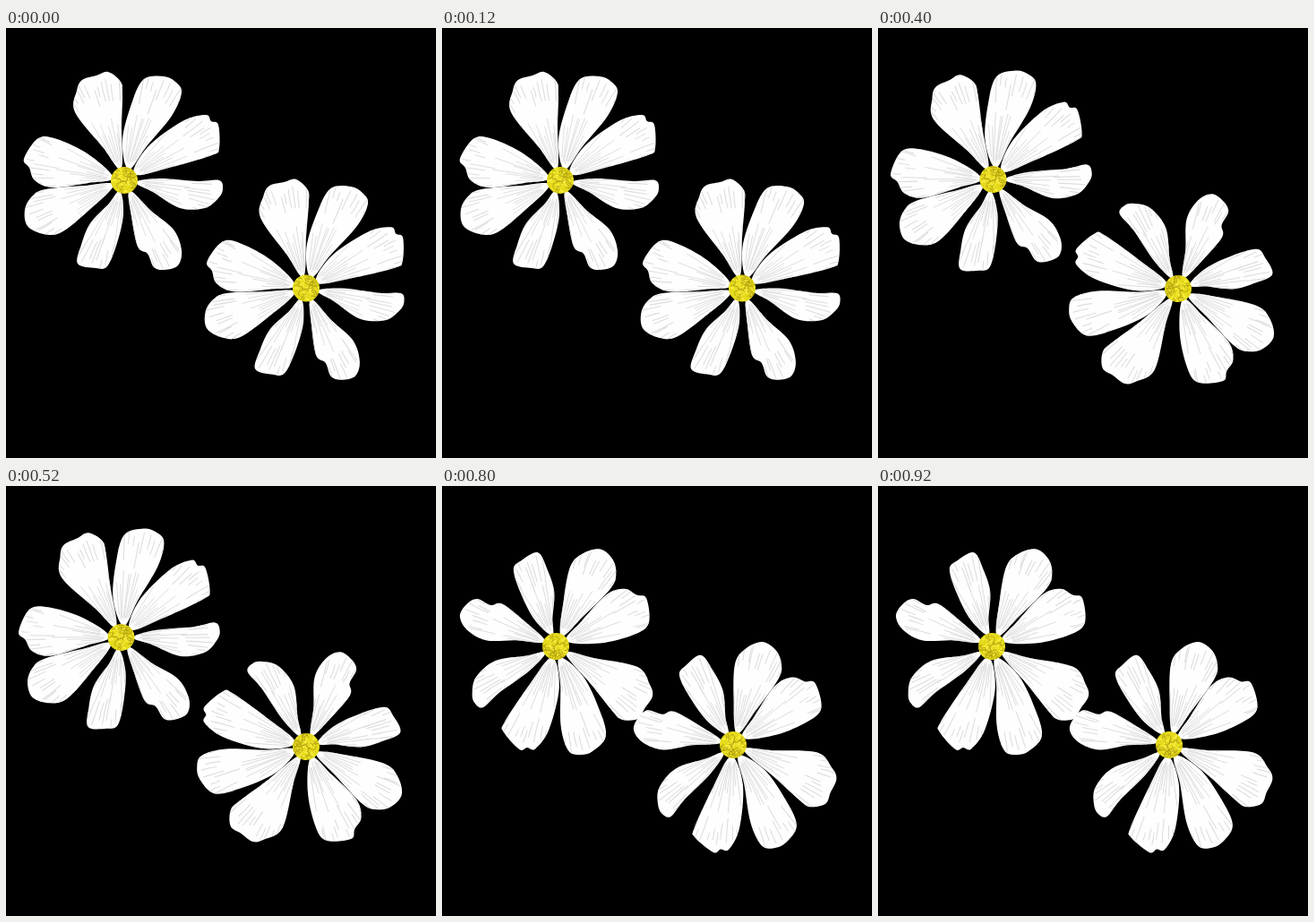
An HTML page with a canvas for the animation above (1 s loop, 480 by 480 pixels).

```html
<!DOCTYPE html>
<html lang="en">
<head>
<meta charset="utf-8">
<title>Daisies</title>
<style>
  html, body { margin: 0; width: 100%; height: 100%; overflow: hidden; background: #000; }
  canvas { display: block; width: 100vw; height: 100vh; }
</style>
</head>
<body>
<canvas id="stage" width="480" height="480"></canvas>
<script>
const ctx = document.getElementById('stage').getContext('2d');
const STEP = 200;

// Petal outlines, clockwise, relative to the flower centre.
const outlines = [
  [-24,-37, -55,-76, -53,-100, -47,-112, -31,-117, -18,-121, -4,-110, -2,-95, -3,-58],
  [-2,-45, 9,-88, 22,-113, 44,-116, 57,-110, 64,-98, 53,-72, 25,-38],
  [26,-37, 65,-66, 91,-73, 97,-66, 105,-62, 106,-36, 98,-28, 50,-14],
  [40,-2, 82,1, 106,0, 110,10, 105,20, 90,31, 62,31, 32,13],
  [8,40, 15,74, 26,82, 33,97, 45,100, 60,95, 64,78, 55,55, 30,34],
  [-1,38, -8,70, -19,96, -32,98, -52,93, -48,72, -38,48, -18,27],
  [-45,6, -88,10, -103,18, -111,33, -108,51, -90,60, -70,58, -40,34],
  [-40,3, -80,8, -100,0, -106,-14, -112,-24, -96,-47, -75,-46, -40,-29]
];

// Each pose: x, y, rotation in degrees, for both flowers.
const poses = [
  [[132, 170, 0], [335, 290.5, 3]],
  [[125.5, 169, 27], [336, 288, -83]],
  [[128.5, 169, -9], [335, 291, -128]],
  [[130, 173.5, -75], [332, 285, 174.5]],
  [[127, 179, 140], [325, 289, 131]]
];

function seeded(s) {
  return () => (s = (s * 16807) % 2147483647) / 2147483647;
}

const polar = (r, a) => [r * Math.cos(a), r * Math.sin(a)];

// Closed Catmull-Rom curve through the points.
function smooth(pts) {
  const path = new Path2D(), n = pts.length;
  const at = i => pts[(i + n) % n];
  path.moveTo(...pts[0]);
  for (let i = 0; i < n; i++) {
    const [a, b, c, d] = [at(i - 1), at(i), at(i + 1), at(i + 2)];
    path.bezierCurveTo(
      b[0] + (c[0] - a[0]) / 6, b[1] + (c[1] - a[1]) / 6,
      c[0] - (d[0] - b[0]) / 6, c[1] - (d[1] - b[1]) / 6, c[0], c[1]);
  }
  path.closePath();
  return path;
}

function addStroke(path, from, to, a, bend) {
  path.moveTo(...polar(from, a));
  path.quadraticCurveTo(...polar((from + to) / 2, a + bend), ...polar(to, a));
}

function makePetal(flat, index) {
  const rnd = seeded(911 + index * 77);
  const pts = [];
  for (let i = 0; i < flat.length; i += 2) pts.push([flat[i], flat[i + 1]]);
  const sum = pts.reduce((s, p) => [s[0] + p[0], s[1] + p[1]], [0, 0]);
  const axis = Math.atan2(sum[1], sum[0]);
  const reach = Math.max(...pts.map(p => Math.hypot(...p)));
  pts.unshift(polar(13, axis));

  const veins = new Path2D(), tips = new Path2D();
  for (let i = 0; i < 11; i++) {
    const a = axis + (i - 5) * 0.058 + (rnd() - 0.5) * 0.03;
    addStroke(veins, 18 + rnd() * 8, 42 + rnd() * 36, a, (rnd() - 0.5) * 0.03);
  }
  for (let i = 0; i < 13; i++) {
    const a = axis + (i - 6) * 0.052 + (rnd() - 0.5) * 0.04;
    const end = reach * (0.86 + rnd() * 0.12);
    addStroke(tips, end - 8 - rnd() * 22, end, a, (rnd() - 0.5) * 0.02);
  }
  return { shape: smooth(pts), veins, tips };
}

function makeCurls(seed, count) {
  const rnd = seeded(seed), path = new Path2D();
  for (let i = 0; i < count; i++) {
    const [x, y] = polar(13.5 * Math.sqrt(rnd()), rnd() * 7);
    const a = rnd() * 7, [dx, dy] = polar(2.2, a);
    path.moveTo(x - dx, y - dy);
    path.quadraticCurveTo(x + dy, y - dx, x + dx, y + dy);
  }
  return path;
}

const petals = outlines.map(makePetal);
const darkCurls = makeCurls(4021, 44);
const lightCurls = makeCurls(733, 30);

function line(path, color, width) {
  ctx.strokeStyle = color;
  ctx.lineWidth = width;
  ctx.stroke(path);
}

function drawFlower([x, y, deg]) {
  ctx.save();
  ctx.translate(x, y);
  ctx.rotate(deg * Math.PI / 180);
  ctx.lineCap = 'round';
  for (const p of petals) {
    ctx.save();
    ctx.fillStyle = '#fefefe';
    ctx.fill(p.shape);
    ctx.clip(p.shape);
    line(p.veins, '#dcdcdc', 0.9);
    line(p.tips, '#dedede', 1.1);
    ctx.restore();
  }
  ctx.beginPath();
  ctx.arc(0, 0, 15, 0, Math.PI * 2);
  ctx.fillStyle = '#e6da1c';
  ctx.fill();
  ctx.clip();
  line(lightCurls, '#f6ee3c', 1.2);
  line(darkCurls, '#b3a312', 0.9);
  ctx.restore();
}

let shown = -1;
const start = performance.now();

function tick() {
  const pose = Math.floor((performance.now() - start) / STEP) % poses.length;
  if (pose !== shown) {
    shown = pose;
    ctx.fillStyle = '#000';
    ctx.fillRect(0, 0, 480, 480);
    poses[pose].forEach(drawFlower);
  }
  requestAnimationFrame(tick);
}
tick();
</script>
</body>
</html>
```
